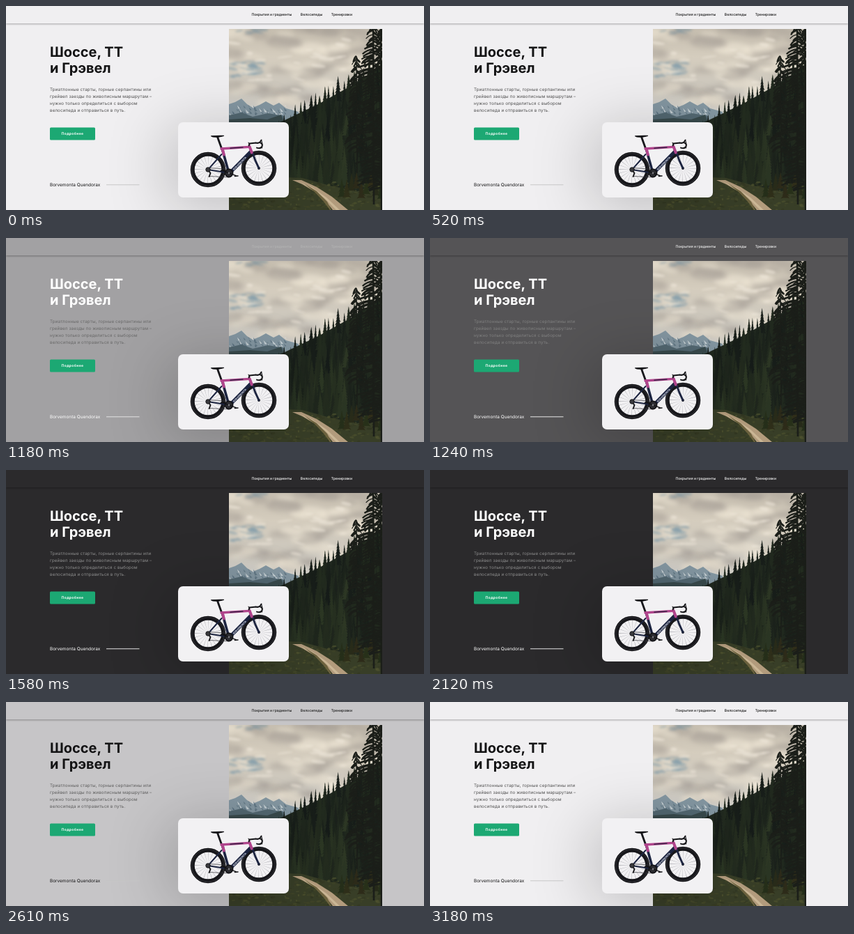
An HTML page with a canvas that plays this animation: 600 by 293 pixels, repeating every 3.21 s.

```html
<!DOCTYPE html>
<html lang="ru">
<head>
<meta charset="utf-8">
<title>Шоссе, ТТ и Грэвел</title>
<style>
  html, body { margin: 0; width: 100%; height: 100%; overflow: hidden; }
  body { position: relative; background: var(--bg); }
  header, canvas, .card, svg { position: absolute; left: 0; top: 0; }
  header { width: 600px; height: 25px; background: var(--bg); box-shadow: 0 1px 2.5px rgba(0, 0, 0, .32); }
  canvas { left: 320px; top: 33px; width: 220px; height: 260px; }
  .card {
    left: 247px; top: 167px; width: 159px; height: 108px; border-radius: 7px;
    background: #f2f1f3; box-shadow: -12px 10px 90px rgba(0, 0, 0, .23);
  }
  text { font-family: Inter, sans-serif; text-rendering: geometricPrecision; white-space: pre; }
  .nav { font-size: 5.1px; font-weight: 500; fill: var(--nav); }
  .title { font-size: 20px; font-weight: 700; fill: var(--ink); }
  .lead { font-size: 6.25px; letter-spacing: .11px; fill: var(--lead); }
  .cta { font-size: 5px; font-weight: 700; letter-spacing: .38px; fill: #fff; }
  .model { font-size: 6.45px; fill: var(--ink); }
  .decal { font-size: 3.6px; font-weight: 700; fill: #dfe3ea; }
</style>
</head>
<body>
<header></header>
<canvas width="440" height="520"></canvas>
<div class="card"></div>
<svg width="600" height="293" viewBox="0 0 600 293">
  <g class="nav">
    <text x="352.4" y="13.9">Покрытия и градиенты</text>
    <text x="422.8" y="13.9">Велосипеды</text>
    <text x="466.7" y="13.9">Тренировки</text>
  </g>
  <g class="title">
    <text x="63" y="73.3">Шоссе, ТТ</text>
    <text x="63" y="95.8">и Грэвел</text>
  </g>
  <g class="lead">
    <text x="63" y="121.8">Триатлонные старты, горные серпантины или</text>
    <text x="63" y="132">грейвел заезды по живописным маршрутам –</text>
    <text x="63" y="142.2">нужно только определиться с выбором</text>
    <text x="63" y="152.4">велосипеда и отправиться в путь.</text>
  </g>
  <rect x="63" y="174.5" width="65" height="18" rx="1.5" fill="#1ca873"/>
  <text class="cta" x="79.6" y="185.3">Подробнее</text>
  <text class="model" x="63" y="259">Borvemonta Quendorax</text>
  <path d="M144 256.8H191.5" stroke="var(--line)" stroke-width=".9"/>

  <defs>
    <g id="wheel" fill="none">
      <circle r="10" stroke="#a2a2a8" stroke-width="20" stroke-dasharray=".28 2.86"/>
      <circle r="21.6" stroke="#17171b" stroke-width="4.6"/>
      <circle r="23.7" stroke="#55555a" stroke-width=".5"/>
      <circle r="24.5" stroke="#111114" stroke-width="1.5"/>
      <circle r="1.9" fill="#151518"/>
    </g>
  </defs>
  <use href="#wheel" x="290" y="235"/>
  <use href="#wheel" x="363" y="233"/>
  <g fill="none" stroke-linecap="round" stroke-linejoin="round">
    <path d="M290 235L309.5 213M290 235L320 240" stroke="#1c2440" stroke-width="1.9"/>
    <path d="M303.5 188L310 206" stroke="#17171b" stroke-width="2.8"/>
    <path d="M310.5 206L320 240" stroke="#1c2440" stroke-width="3.6"/>
    <path d="M351 209.5L321.5 239.5" stroke="#1c2440" stroke-width="5"/>
    <path d="M353.5 210Q357 221 363 233" stroke="#1c2440" stroke-width="2.8"/>
    <path d="M309 205L349 202.4" stroke="#b0458c" stroke-width="3.4"/>
    <path d="M310.6 205L312.8 213.5M349.6 202L352.8 210.5" stroke="#b0458c" stroke-width="4"/>
    <path d="M322 204.2L340 203" stroke="#3a2547" stroke-width="1.4"/>
    <path d="M294.5 186.8Q302 186.2 312.5 186.4Q306 188.3 303 188.2Q297 188.6 294.5 186.8Z"
      fill="#151518" stroke="#151518" stroke-width="1.1"/>
    <path d="M348.6 200.5L349.5 197.6L359 196.6M359 196.6Q362 197.5 364.5 195.5L366.6 192.5M364.5 196Q369.5 198 367 202.5Q364.5 205.5 360 203.6"
      stroke="#151518" stroke-width="2"/>
    <path d="M366.5 193Q368.8 198 367.5 204M348 196.2L350 199" stroke="#151518" stroke-width="1.1"/>
    <path d="M291 232.6L320 234.4M292 244.5L320 246" stroke="#333338" stroke-width=".7"/>
    <path d="M290.5 236L293.5 240L291.6 245" stroke="#19191c" stroke-width="2"/>
    <circle cx="290" cy="235" r="3.2" fill="#39393d" stroke="#19191c"/>
    <circle cx="320" cy="240" r="5.6" fill="#2b2b30" stroke="#131316" stroke-width="1.6"/>
    <path d="M320 240L330 243.6M328.4 244.5L333 244M320 240L311 236.2M308.4 236.6L313 236" stroke="#131316" stroke-width="1.5"/>
    <circle cx="320" cy="240" r="1.4" fill="#77777d"/>
  </g>
  <text class="decal" transform="translate(327.2 236.3) rotate(-45.5)">BORVEMONTA</text>
</svg>
<script>
const LOOP = 3210, TO_DARK = 1120, TO_LIGHT = 2490;
const ctx = document.querySelector('canvas').getContext('2d');

let seed = 11;
const rnd = (a = 0, b = 1) => {
  seed = (seed * 16807) % 2147483647;
  return a + (b - a) * seed / 2147483647;
};
const rgb = (r, g, b, a = 1) => `rgba(${r},${g},${b},${a})`;

function poly(color, ...p) {
  ctx.fillStyle = color;
  ctx.beginPath();
  for (let i = 0; i < p.length; i += 2) ctx.lineTo(p[i], p[i + 1]);
  ctx.fill();
}

function puff(x, y, rx, ry, color) {
  ctx.fillStyle = color;
  ctx.beginPath();
  ctx.ellipse(x, y, rx, ry, rnd(-.25, .25), 0, 7);
  ctx.fill();
}

function fir(x, y, h, w, color) {
  const left = [], right = [];
  const tiers = Math.max(5, Math.round(h / 4));
  for (let i = 1; i <= tiers; i++) {
    const k = i / tiers, half = w / 2 * k;
    right.push(x + half * rnd(.8, 1.2), y + h * k, x + half * .55, y + h * k - 1);
    left.unshift(x - half * .55, y + h * k - 1, x - half * rnd(.8, 1.2), y + h * k);
  }
  poly(color, x, y, ...right, ...left);
}

function sky() {
  const g = ctx.createLinearGradient(0, 33, 0, 165);
  [[0, '#c6beb0'], [.3, '#d5cdbe'], [.65, '#cdc8be'], [1, '#d9d8d3']].forEach(s => g.addColorStop(...s));
  ctx.fillStyle = g;
  ctx.fillRect(320, 33, 220, 260);
  ctx.filter = 'blur(7px)';
  for (let i = 0; i < 75; i++) {
    const x = rnd(315, 540), y = rnd(33, 140), s = rnd(5, 14);
    puff(x, y, s * 1.9, s * .6, i % 2 ? rgb(157, 151, 142, .4) : rgb(238, 230, 214, .6));
  }
  ctx.filter = 'blur(3px)';
  for (let i = 0; i < 26; i++) {
    puff(rnd(322, 372), rnd(80, 102), rnd(3, 9), rnd(.8, 2.2), rgb(124, 153, 170, .5));
  }
  for (let i = 0; i < 9; i++) puff(rnd(328, 372), rnd(33, 40), rnd(4, 9), 1.7, rgb(130, 150, 160, .45));
  for (let i = 0; i < 24; i++) {
    puff(rnd(322, 500), rnd(48, 125), rnd(4, 13), rnd(1, 3), rgb(242, 235, 222, .55));
  }
  ctx.filter = 'none';
}

function mountains() {
  poly('#8497a2', 320, 141, 329, 138, 338, 133, 346, 141, 354, 146, 364, 142, 373, 137, 384, 143,
    392, 139, 402, 147, 420, 152, 420, 170, 320, 170);
  for (let i = 0; i < 45; i++) {
    const x = rnd(320, 402), y = rnd(141, 156), s = rnd(2, 6);
    poly(i % 3 ? rgb(82, 105, 120, .65) : rgb(222, 228, 229, .75), x, y, x + s, y + s, x + s * .4, y + s * 1.1);
  }
  poly('#536872', 320, 157, 338, 153, 354, 159, 376, 154, 400, 158, 400, 170, 320, 170);
  poly('#394a4c', 320, 163, 350, 161, 375, 163, 395, 156, 400, 170, 320, 170);
}

function forest() {
  const ridge = x => 166 - (x - 385) * .62;
  poly('#20281f', 375, 174, 400, 164, 450, 140, 500, 112, 540, 85, 540, 293, 320, 293, 320, 174);
  for (let row = 0; row < 9; row++) {
    for (let x = 384; x < 545; x += rnd(5, 10)) {
      const y = ridge(x) + row * 15 + rnd(-9, 9);
      const tint = rnd(-6, 9) + (row > 3 && x < 490 ? 9 : 0);
      fir(x, y, rnd(32, 56), rnd(10, 16), rgb(27 + tint, 34 + tint * 1.2, 27 + tint * .5));
    }
  }
}

function ground() {
  poly('#383e27', 320, 270, 400, 246, 425, 247, 465, 258, 505, 266, 540, 262, 540, 293, 320, 293);
  for (let i = 0; i < 260; i++) {
    const x = rnd(320, 540), y = rnd(252, 293), lit = rnd(-14, 22);
    puff(x, y, rnd(1, 4), rnd(.6, 1.8), rgb(60 + lit, 64 + lit, 38 + lit * .5, .7));
  }
  poly('#b39c7d', 411, 250, 424, 250, 446, 260, 468, 274, 491, 293, 469, 293, 458, 279, 442, 266, 425, 256);
  poly('#cbb796', 420, 252, 440, 261, 460, 275, 479, 293, 474, 293, 457, 276, 437, 262);
  poly('#6d633f', 428, 255, 446, 266, 461, 281, 467, 293, 465, 293, 456, 281, 443, 267);
  for (let x = 482; x < 540; x += 7) fir(x, rnd(238, 255), rnd(22, 32), 12, rgb(34 + rnd(0, 14), 39 + rnd(0, 10), 25));
}

function tallTree(x, top, bottom, reach, trunk) {
  ctx.strokeStyle = '#1b1e19';
  ctx.lineWidth = trunk;
  ctx.beginPath();
  ctx.moveTo(x, top);
  ctx.lineTo(x + 1, bottom);
  ctx.stroke();
  for (let y = top; y < bottom - 30; y += 1.5) {
    const len = (6 + reach * Math.min(1, (y - top) / 90)) * rnd(.35, 1);
    const side = rnd() < .5 ? -1 : 1;
    ctx.lineWidth = rnd(1, 2.8);
    ctx.beginPath();
    ctx.moveTo(x, y);
    ctx.quadraticCurveTo(x + side * len * .6, y + 1, x + side * len, y + rnd(4, 9));
    ctx.stroke();
  }
}

function paintPhoto() {
  ctx.scale(2, 2);
  ctx.translate(-320, -33);
  sky();
  mountains();
  forest();
  ground();
  tallTree(503, 72, 240, 11, 1.5);
  tallTree(538, 33, 293, 14, 2.5);
  tallTree(527, 20, 285, 21, 2.6);
}

// Cubic Bézier (.25, .1, .25, 1)
function ease(x) {
  if (x <= 0 || x >= 1) return x <= 0 ? 0 : 1;
  const curve = (a, b, u) => 3 * a * u * (1 - u) ** 2 + 3 * b * u * u * (1 - u) + u ** 3;
  let lo = 0, hi = 1;
  for (let i = 0; i < 24; i++) {
    const mid = (lo + hi) / 2;
    if (curve(.25, .25, mid) < x) lo = mid; else hi = mid;
  }
  return curve(.1, 1, lo);
}

const mix = (a, b, k) => `rgb(${a.map((v, i) => v + (b[i] - v) * k)})`;
const gray = v => [v, v, v];
const root = document.documentElement.style;

function render(t) {
  const dark = ms => ease((t - TO_DARK) / ms) - ease((t - TO_LIGHT) / ms);
  const slow = dark(250), fast = dark(150);
  const isDark = t >= TO_DARK && t < TO_LIGHT;
  root.setProperty('--bg', mix([240, 239, 241], [43, 42, 44], slow));
  root.setProperty('--lead', mix(gray(78), gray(143), slow));
  root.setProperty('--nav', mix(gray(20), gray(250), fast));
  root.setProperty('--line', mix(gray(197), gray(250), fast));
  root.setProperty('--ink', isDark ? '#fff' : '#131314');
}

paintPhoto();
const start = performance.now();
function tick() {
  render((performance.now() - start) % LOOP);
  requestAnimationFrame(tick);
}
tick();
</script>
</body>
</html>
```
